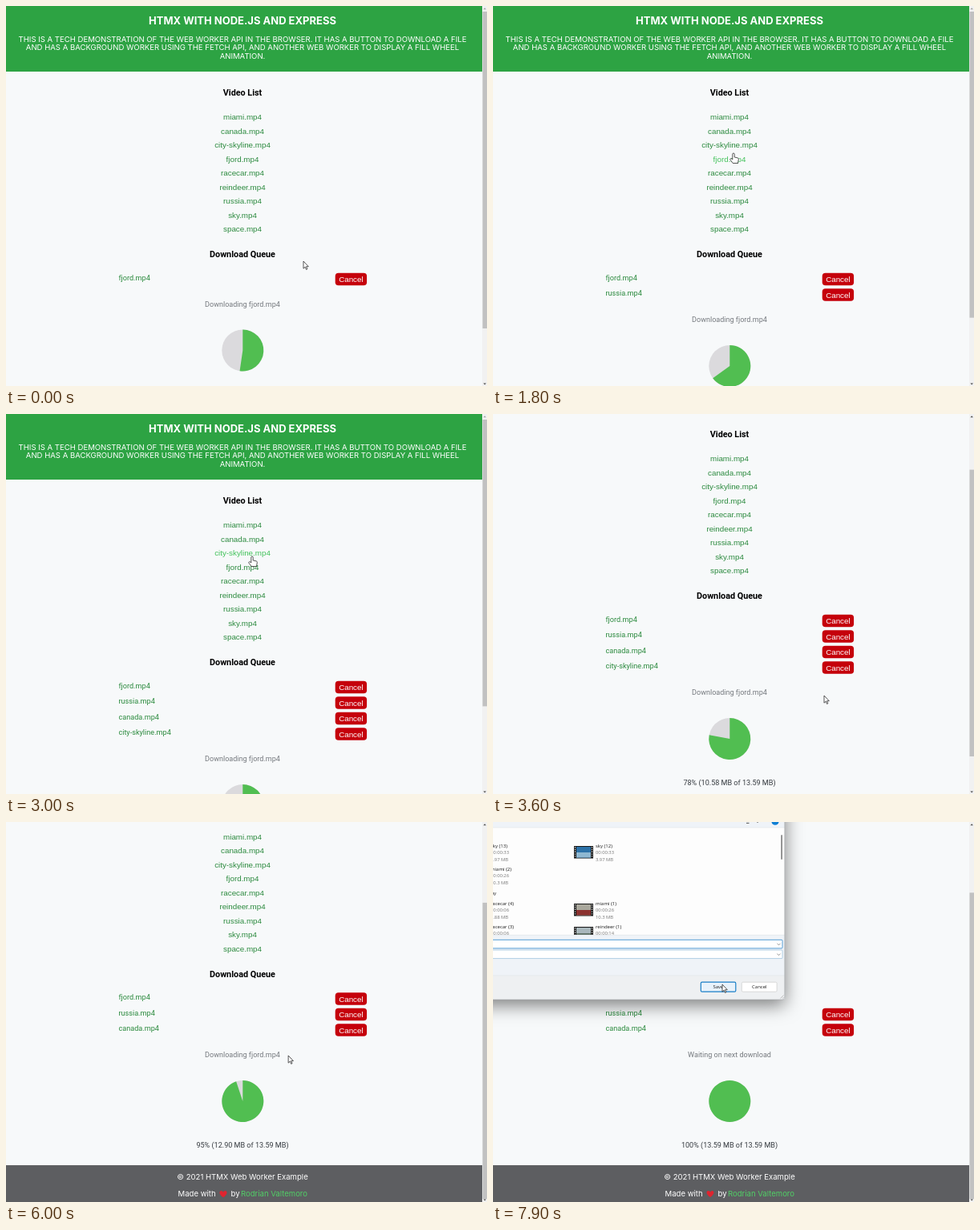
Recreate the animation shown at these times as an HTML page. Size 600 by 475 pixels, loop 8 s.

```html
<!DOCTYPE html>
<html lang="en">
<head>
<meta charset="utf-8">
<title>Web worker downloads</title>
<style>
  html, body { margin: 0; width: 100%; height: 100%; overflow: hidden; background: #f7f9fa; }
  svg { display: block; width: 600px; height: 475px; }
  text { white-space: pre; }
  .brand { font: 9.55px Inter, sans-serif; fill: #fff; }
  .title { font: 700 13px Inter, sans-serif; fill: #fff; }
  .head { font: 700 10.8px Roboto, sans-serif; fill: #000; }
  .link { font: 9.8px "Liberation Sans", Arial, sans-serif; fill: #2b8a3e; }
  .link.hover { fill: #43c25b; }
  .job { font: 9.15px Roboto, sans-serif; fill: #2b8a3e; }
  .note { font: 9.05px Roboto, sans-serif; fill: #75797e; }
  .size { font: 9.05px Roboto, sans-serif; fill: #363b40; }
  .label { font: 9.8px "Liberation Sans", Arial, sans-serif; fill: #fff; }
  .cancel { fill: #c5000b; }
  .cancel.hover { fill: #e01524; }
  .author { fill: #51cf66; }
  .file { font: 6px "Open Sans", sans-serif; fill: #1b1b1b; }
  .meta { font: 5.8px "Open Sans", sans-serif; fill: #777; }
  .mid { text-anchor: middle; }
  .frame { filter: drop-shadow(0 7px 11px rgba(0, 0, 0, .5)); }
</style>
</head>
<body>
<svg viewBox="0 0 600 475" aria-label="Download page">
  <defs>
    <clipPath id="listClip"><rect x="0" y="7" width="364" height="134"/></clipPath>
  </defs>
  <rect width="600" height="475" fill="#f7f9fa"/>
  <g id="page">
    <rect width="594" height="82" fill="#2da343"/>
    <text class="title mid" x="295" y="23.3">HTMX WITH NODE.JS AND EXPRESS</text>
    <g class="brand mid">
      <text x="295" y="44.5">THIS IS A TECH DEMONSTRATION OF THE WEB WORKER API IN THE BROWSER. IT HAS A BUTTON TO DOWNLOAD A FILE</text>
      <text x="295" y="55.3">AND HAS A BACKGROUND WORKER USING THE FETCH API, AND ANOTHER WEB WORKER TO DISPLAY A FILL WHEEL</text>
      <text x="295" y="66.2">ANIMATION.</text>
    </g>
    <text class="head mid" x="295" y="111.8">Video List</text>
    <g id="links"></g>
    <text class="head mid" x="295" y="314.2">Download Queue</text>
    <g id="jobs"></g>
    <g id="below">
      <text id="note" class="note mid" x="295" y="434.2"></text>
      <circle cx="295.3" cy="489" r="26" fill="#dbdadd"/>
      <path id="pie" fill="#51be51"/>
      <text id="size" class="size mid" x="295" y="547.3"></text>
      <rect y="569" width="594" height="50" fill="#5d5e61"/>
      <g class="brand">
        <text class="mid" x="295" y="587.4">© 2021 HTMX Web Worker Example</text>
        <text x="214.6" y="608.3">Made with</text>
        <text x="280.5" y="608.3">by</text>
        <text class="author" x="293" y="608.3">Rodrian Valtemoro</text>
      </g>
      <path id="heart" d="M0 4.4C-7 -.6 -4.8 -4.4 -2.4 -4.2Q-.7 -4 0 -2.3Q.7 -4 2.4 -4.2C4.8 -4.4 7 -.6 0 4.4Z" fill="#e0242f"/>
    </g>
  </g>
  <rect x="594" width="6" height="475" fill="#f1f1f1"/>
  <rect id="thumb" x="594.5" width="5.5" fill="#c1c1c1"/>
  <path id="upArrow" d="M595.4 4.3 597.2 2.2 599 4.3Z"/>
  <path id="downArrow" d="M595.4 471.4 597.2 473.5 599 471.4Z"/>
  <g id="dialog">
    <rect class="frame" x="-40" y="-40" width="404" height="262" rx="3" fill="#eff3f8"/>
    <path d="M0 7H364V141H0Z" fill="#fdfdfd"/>
    <path d="M0 192H364V219q0 3-3 3H0Z" fill="#eef0f2"/>
    <path d="M0 7H364M0 141.3H364M0 192H364" stroke="#dfe2e6" stroke-width=".6"/>
    <path d="M363.7 0V219q0 3-3 3H0" fill="none" stroke="#a5a8ab" stroke-width=".6"/>
    <path d="M316 -1H321M316 1.4H319.5" stroke="#555"/>
    <circle cx="352" cy="-.8" r="4.6" fill="#0f7fd4"/>
    <g id="files" clip-path="url(#listClip)">
      <text class="file" x="4" y="91" text-anchor="end">Yesterday</text>
    </g>
    <rect x="359.2" y="16" width="1.8" height="31" rx=".9" fill="#8a8a8a"/>
    <g fill="#fff" stroke-width=".8">
      <rect x="-5" y="147.3" width="366" height="10.6" rx="1" stroke="#2b86c9"/>
      <rect x="-5" y="160" width="366" height="10.6" rx="1" stroke="#9fc3de"/>
      <rect x="259.3" y="200.2" width="43.5" height="12" rx="1.5" fill="#e8f2fb" stroke="#1a7fc8" stroke-width="1.2"/>
      <rect x="310.3" y="200.2" width="43.8" height="12" rx="1.5" stroke="#d0d0d0"/>
    </g>
    <path d="M354.5 151.8l2 2 2-2M354.5 164.6l2 2 2-2M328 -1l2 1.8 2-1.8" fill="none" stroke="#666" stroke-width=".7"/>
    <text class="file mid" x="281" y="208.3">Save</text>
    <text class="file mid" x="332.3" y="208.3">Cancel</text>
    <path d="M358.5 220.5l4-4M361 220.5l1.5-1.5" stroke="#aaa" stroke-width=".7"/>
  </g>
  <g id="cursor" fill="#fff" stroke="#222" stroke-width=".75" stroke-linejoin="round">
    <path id="arrow" d="M0 0V9.2L2.1 7.2 3.5 10.4 4.9 9.8 3.5 6.7H6.3Z"/>
    <path id="hand" d="M-1.2 1.2a1.2 1.2 0 0 1 2.4 0V5l4 .9q1.3.4 1.1 1.7L5.5 12.5H-.8L-4 8.3q-.6-1 .3-1.5t1.6.3l.9.9Z"/>
  </g>
</svg>
<script>
const LOOP = 8000, STEP = 100, ROW = 19.5, VIEW = 475;
const $ = id => document.getElementById(id);

function add(parent, tag, attrs, text) {
  const node = document.createElementNS("http://www.w3.org/2000/svg", tag);
  for (const key in attrs) node.setAttribute(key, attrs[key]);
  if (text) node.textContent = text;
  return parent.appendChild(node);
}
const show = (node, on) => node.setAttribute("visibility", on ? "visible" : "hidden");
const move = (node, x, y) => node.setAttribute("transform", `translate(${x} ${y})`);
const clamp = v => Math.max(0, Math.min(1, v));
const smooth = v => v * v * (3 - 2 * v);
const linear = v => v;

// Interpolates rows of [time, ...values].
function track(keys, t, ease) {
  const next = keys.findIndex(k => k[0] > t);
  if (next < 0) return keys[keys.length - 1].slice(1);
  if (next === 0) return keys[0].slice(1);
  const a = keys[next - 1], b = keys[next];
  const f = ease((t - a[0]) / (b[0] - a[0]));
  return a.slice(1).map((v, i) => v + (b[i + 1] - v) * f);
}

const pointer = [
  [0, 371, 319], [200, 371, 319], [900, 304, 247], [1200, 303, 246],
  [1800, 300, 184], [2100, 300, 157], [2250, 300, 157], [2600, 307, 178],
  [3100, 307, 178], [3600, 413, 352], [3900, 415, 345], [4500, 432, 262],
  [5300, 432, 262], [6500, 304, 310], [7200, 304, 310], [7800, 286, 203]
];
const scrolling = [[3200, 0], [3600, 83], [3900, 140]];

const links = ["miami", "canada", "city-skyline", "fjord", "racecar", "reindeer", "russia", "sky", "space"]
  .map((name, i) => {
    const y = 139 + 17.5 * i;
    const node = add($("links"), "text", { class: "link mid", x: 295, y: y + 3.4 }, name + ".mp4");
    return { node, y };
  });

const jobs = [
  { name: "fjord", from: 0, to: 6800 },
  { name: "russia", from: 1100, to: LOOP },
  { name: "canada", from: 2200, to: LOOP },
  { name: "city-skyline", from: 2700, to: 5000 }
];
for (const job of jobs) {
  job.node = add($("jobs"), "g", {});
  add(job.node, "text", { class: "job", x: 140.4, y: 342.7 }, job.name + ".mp4");
  job.button = add(job.node, "rect", { class: "cancel", x: 410.7, y: 333.8, width: 39.4, height: 15.5, rx: 4 });
  add(job.node, "text", { class: "label mid", x: 430.4, y: 345 }, "Cancel");
}

function addFile(x, y, name, time, size, scene) {
  const files = $("files");
  add(files, "text", { class: "file", x, y: y + 2.2 }, name);
  add(files, "text", { class: "meta", x, y: y + 10.4 }, time);
  add(files, "text", { class: "meta", x, y: y + 18.8 }, size);
  if (!scene) return;
  const left = x - 27, [sky, ground] = scene;
  add(files, "rect", { x: left, y, width: 24, height: 15.5, fill: "#151515" });
  add(files, "rect", { x: left + 3, y: y + 1, width: 18, height: 13.5, fill: sky });
  add(files, "rect", { x: left + 3, y: y + 8, width: 18, height: 6.5, fill: ground });
  add(files, "path", {
    d: `M${left + 1.5} ${y + 1}v14M${left + 22.5} ${y + 1}v14`,
    stroke: "#ddd", "stroke-width": 1.2, "stroke-dasharray": "1.4 1.4"
  });
}
addFile(-3, 30, "sky (13)", "00:00:33", "3.97 MB");
addFile(-3, 59, "miami (2)", "00:00:26", "10.3 MB");
addFile(-3, 102, "racecar (4)", "00:00:06", "2.88 MB");
addFile(-3, 131, "racecar (3)", "00:00:06", "2.88 MB");
addFile(128, 30, "sky (12)", "00:00:33", "3.97 MB", ["#2d72a8", "#8fb8d2"]);
addFile(128, 102, "miami (1)", "00:00:26", "10.3 MB", ["#a9a79c", "#8c3230"]);
addFile(128, 131, "reindeer (1)", "00:00:14", "6.21 MB", ["#a9b7bc", "#66766c"]);

function drawPie(part) {
  const cx = 295.3, cy = 489, r = 26;
  const a = Math.min(part, .99999) * 2 * Math.PI;
  const x = cx + r * Math.sin(a), y = cy - r * Math.cos(a);
  $("pie").setAttribute("d", `M${cx} ${cy}V${cy - r}A${r} ${r} 0 ${part > .5 ? 1 : 0} 1 ${x} ${y}Z`);
}

function render(t) {
  const active = jobs.filter(j => t >= j.from && t < j.to);
  const shift = (active.length - 4) * ROW;
  const height = 615 + shift;
  const scroll = Math.min(track(scrolling, t, linear)[0], height - VIEW);
  const [x, y] = track(pointer, t, smooth);
  const docY = y + scroll;
  const saving = t >= 7200;

  move($("page"), 0, -scroll);
  move($("below"), 0, shift);

  let onLink = false;
  for (const link of links) {
    const hover = !saving && Math.abs(docY - link.y) < 8.75 && Math.abs(x - 295) < 26;
    link.node.classList.toggle("hover", hover);
    onLink = onLink || hover;
  }
  for (const job of jobs) {
    const i = active.indexOf(job);
    show(job.node, i >= 0);
    move(job.node, 0, i * ROW);
    const hover = Math.abs(docY - 341.5 - i * ROW) < 7.8 && Math.abs(x - 430.4) < 19.7;
    job.button.classList.toggle("hover", hover);
  }

  const part = Math.min(1, .523 + .000071 * t);
  drawPie(part);
  $("size").textContent = `${Math.round(part * 100)}% (${(part * 13.59).toFixed(2)} MB of 13.59 MB)`;
  $("note").textContent = t < 6800 ? "Downloading fjord.mp4" : "Waiting on next download";
  const beat = .97 + .06 * Math.sin(t * Math.PI / 500);
  $("heart").setAttribute("transform", `translate(271 605) scale(${beat})`);

  const scale = 464 / height;
  $("thumb").setAttribute("y", 7 + scroll * scale);
  $("thumb").setAttribute("height", VIEW * scale);
  $("upArrow").setAttribute("fill", scroll > 0 ? "#505050" : "#a3a3a3");
  $("downArrow").setAttribute("fill", "#505050");

  show($("dialog"), saving);
  $("dialog").setAttribute("opacity", clamp((t - 7100) / 200));
  move($("cursor"), x, y);
  show($("hand"), onLink);
  show($("arrow"), !onLink);
}

const start = performance.now();
function tick() {
  const t = (performance.now() - start) % LOOP;
  render(Math.floor(t / STEP) * STEP);
  requestAnimationFrame(tick);
}
tick();
</script>
</body>
</html>
```
